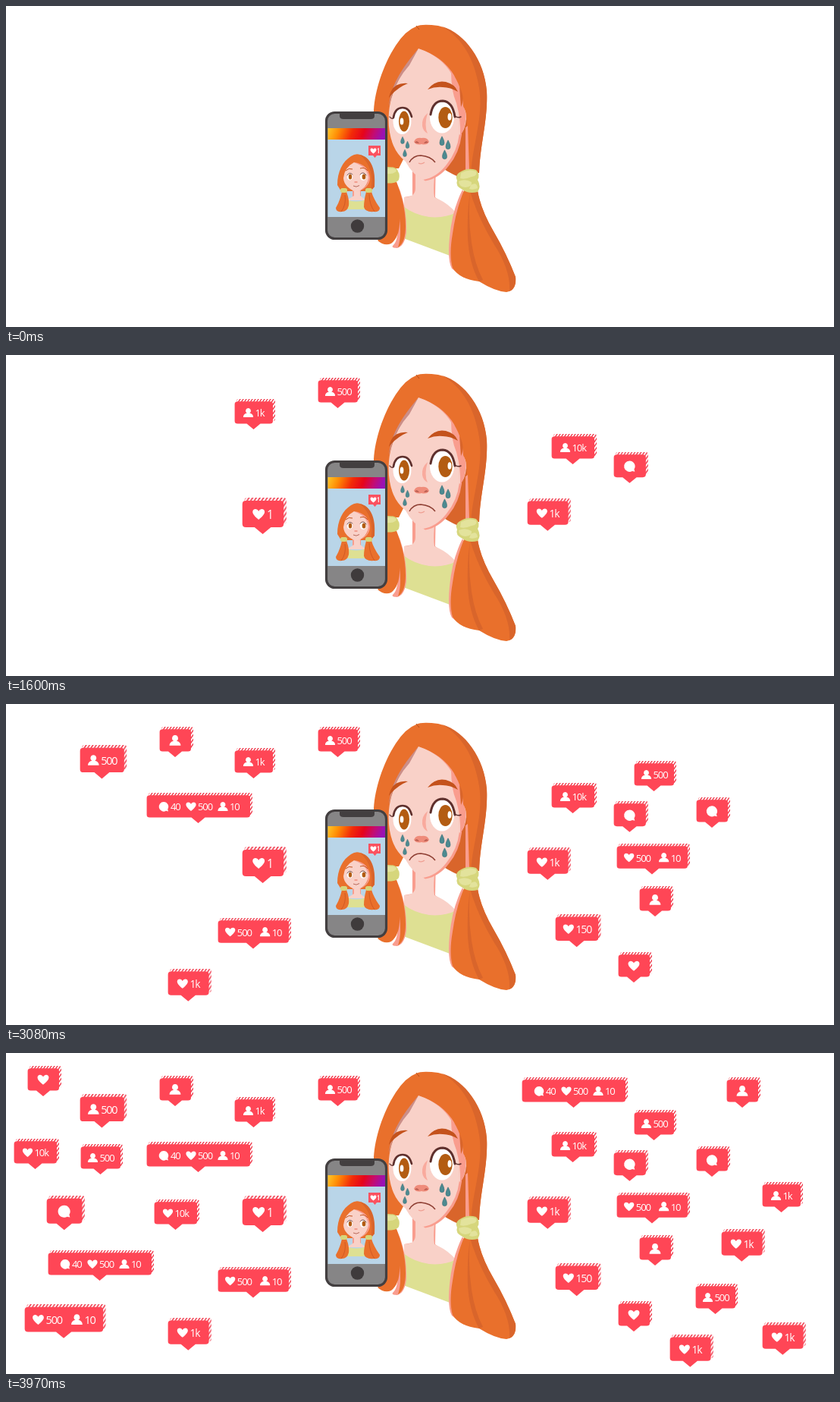
An HTML page for the animation above (4.07 s loop, 1092 px wide and 423 px high).

```html
<!DOCTYPE html>
<html lang="en">
<head>
<meta charset="utf-8">
<title>Likes</title>
<style>
html, body { margin: 0; width: 100%; height: 100%; overflow: hidden; background: #fff; }
svg { display: block; width: 100%; height: 100%; }
.badge text { font: 13px "Open Sans", "Noto Sans", sans-serif; letter-spacing: -1.1px; fill: #fff; }
.hair { fill: #e9702c; }
.dark { fill: #d9652b; }
.skin { fill: #f9d1c8; }
.pink { fill: #f99d8e; }
.band { fill: #d6d67c; }
.light { fill: #e3e39c; }
.shirt { fill: #dee093; }
.iris { fill: #b35c12; }
.lid { fill: none; stroke: #5e302d; stroke-linecap: round; }
.brow { fill: #c4521c; }
.tear { fill: #4d8a90; stroke: #3b6f78; stroke-width: .6; }
</style>
</head>
<body>
<svg viewBox="0 0 1092 423">
  <defs>
    <pattern id="hatch" width="4" height="6" patternUnits="userSpaceOnUse">
      <path d="M-1 7.5L5-1.5M-1 1.5L1-1.5M3 7.5L5 4.5" stroke="#f03c4e" stroke-width="1.5"/>
    </pattern>
    <linearGradient id="bar" x2="1" y2=".08">
      <stop offset="0" stop-color="#ffc928"/>
      <stop offset=".2" stop-color="#ff8d06"/>
      <stop offset=".45" stop-color="#f22a08"/>
      <stop offset=".65" stop-color="#e6041c"/>
      <stop offset=".84" stop-color="#c20c74"/>
      <stop offset="1" stop-color="#9a12b4"/>
    </linearGradient>
    <path id="h" d="M0 5.800C-3.800 2.800-6.600-.2-6.600-2.700C-6.600-6.300-1.900-7 0-3.400C1.900-7 6.600-6.300 6.600-2.700C6.600-.2 3.800 2.800 0 5.800Z"/>
    <path id="p" d="M0-6.4A3.4 3.6 0 0 1 1.8 .3Q6.6 1.4 6.6 5.8H-6.6Q-6.6 1.4-1.8 .3A3.4 3.6 0 0 1 0-6.4Z"/>
    <path id="c" d="M0-6.3A6.3 6.3 0 0 1 5.2 3.4L6 6.2L3 5.5A6.3 6.3 0 1 1 0-6.3Z"/>
    <path id="tear" class="tear" d="M0-6.5Q3.4-.5 3.2 2.6A3.2 3.4 0 0 1-3.2 2.6Q-3.4-.5 0-6.5Z"/>
    <path id="face" d="M544 56C530 76 508 105 505 140Q503 165 511 184Q516 196 527 205Q536 222 550 229Q568 226 581 209Q595 192 598 168L597 120L588 90Q574 66 544 56Z"/>
  </defs>

  <g id="girl">
    <path class="hair" d="M485 142C485 115 497 78 514 52Q527 32 541 27Q548 23 570 26C604 34 631 72 634 112C636 150 625 182 624 220L604 220L570 190L525 200L518 214H500V150Z"/>
    <path class="dark" d="M575 27C606 36 631 72 634 112C636 150 625 182 624 220H613C616 180 630 145 624 108C618 70 602 42 575 27Z"/>
    <path class="dark" d="M600 150L576 214Q590 223 604 228L608 216V150Z"/>
    <path class="pink" d="M536 200H567L566 252L592 272V282H525V252L536 250Z"/>
    <path class="skin" d="M540 206L566 216Q563 240 565 252Q582 259 593 272V284H525V252Q540 252 540 240Z"/>
    <path class="shirt" d="M524 264Q538 275 558 278Q578 280 594 272L588 330L524 306Z"/>

    <path class="pink" d="M515 232Q529 262 528 298Q526 316 516 319Q508 319 510 316Q517 310 517 290L506 240Z"/>
    <path class="hair" d="M500 232H515Q527 262 527 290Q527 312 517 318Q522 304 519 280Q520 304 508 313Q499 317 490 309Q500 300 500 280Z"/>

    <use href="#face" class="pink" x="3" y="1.500"/>
    <use href="#face" class="skin"/>
    <path class="skin" d="M597 132Q607 131 607 148Q606 164 598 170Z"/>
    <path class="pink" d="M587 86Q602 106 603 132Q608 140 606 152Q604 166 599 170Q600 150 594 128Q587 112 587 86Z"/>
    <path class="dark" d="M598 106Q606 122 600 133Z"/>
    <path class="pink" d="M606 160L609 158L611 217H606Z"/>
    <path d="M544 56C526 78 508 100 505 132L508 122Q514 98 532 78Z" fill="#cb8e88"/>
    <path d="M541 26L545 31" stroke="#b8501c" fill="none"/>

    <path class="brow" d="M505 121Q509 100 530 102Q515 108 505 121Z"/>
    <path class="brow" d="M556 110Q566 97 580 100Q592 103 596 113Q586 107 576 107Q566 106 556 110Z"/>

    <ellipse cx="522.500" cy="152" rx="12" ry="17" fill="#fff"/>
    <ellipse class="iris" cx="525" cy="152" rx="7" ry="13.500"/>
    <ellipse cx="522" cy="152" rx="2.400" ry="4.500" fill="#fff"/>
    <path class="lid" stroke-width="2.600" d="M511 147Q513 134 523 134Q532 134 535 146"/>
    <path class="lid" stroke-width="1.300" d="M511 148Q508 149 506 146"/>
    <ellipse cx="575" cy="147" rx="16" ry="20.500" fill="#fff"/>
    <ellipse class="iris" cx="579.500" cy="147" rx="9.200" ry="14"/>
    <ellipse cx="585" cy="146" rx="2.500" ry="4.800" fill="#fff"/>
    <path class="lid" stroke-width="3" d="M560 143Q563 125 576 125Q589 126 592 146"/>
    <path class="lid" stroke-width="1.500" d="M592 145Q596 148 600 146"/>

    <path d="M556 141Q548 148 549 158Q550 165 556 168Q551 158 556 141Z" fill="#f9aa9d"/>
    <path d="M538 179Q540 173 548 174Q556 173 558 179Q555 184 548 182Q541 184 538 179Z" fill="#ef8c7b"/>
    <path d="M539 180Q542 176 545 181ZM551 181Q554 176 557 180Z" fill="#b75a4d"/>
    <path d="M532 206Q537 197 547 197Q560 198 566 206" fill="none" stroke="#8e3f33" stroke-width="1.500"/>
    <path d="M544 207Q548 209 552 206" fill="none" stroke="#efa093" stroke-width="1.300"/>
    <g id="tears"></g>

    <path class="band" d="M500 212Q516 211 517 218Q520 222 518 229Q514 235 500 233Z"/>
    <path class="light" d="M501 214Q512 212 515 217Q512 222 501 221Z"/>

    <path class="pink" d="M602 242Q588 270 585 305Q582 335 588 346L604 358L598 300L606 250Z"/>
    <path class="hair" d="M604 243H622Q626 268 643 297Q660 326 672 357Q674 375 660 377Q645 376 624 363Q598 360 589 345Q584 328 589 300Q593 270 604 243Z"/>
    <path class="dark" d="M612 244H622Q626 268 643 297Q660 326 672 357Q673 372 664 376Q666 348 643 313Q622 278 612 244Z"/>
    <path class="dark" d="M612 246Q609 280 614 312Q618 340 629 361L624 363Q611 340 609 306Q608 270 612 246Z"/>
    <path class="band" d="M597 220Q608 212 620 216Q626 222 622 229Q627 238 622 245Q610 248 602 242Q592 237 595 230Q592 224 597 220Z"/>
    <path class="light" d="M600 220Q610 214 620 218Q622 224 614 225Q605 229 599 227ZM597 231Q606 227 614 232Q615 238 606 239Q597 238 597 231ZM613 236Q621 231 622 240Q616 243 611 241Z"/>
  </g>

  <g id="phone">
    <rect x="422.500" y="140.500" width="79" height="166" rx="11" fill="#868586" stroke="#433f40" stroke-width="3.200"/>
    <path d="M440 139H486V145Q486 149 481 149H445Q440 149 440 145Z" fill="#433f40"/>
    <rect x="424.500" y="161" width="75.500" height="15.500" fill="url(#bar)"/>
    <rect x="424.500" y="176" width="75.500" height="102" fill="#b9d5e8"/>
    <circle cx="463.500" cy="290" r="8.700" fill="#3f3b3c"/>

    <path class="hair" d="M437 236C437 218 444 205 455 198Q461 194 467 196C479 200 487 213 486 238L481 244H442Z"/>
    <path class="dark" d="M467 196C480 199 488 213 486 238L481 244Q487 214 467 196Z"/>
    <path class="pink" d="M457 238H468V252H457Z"/>
    <path class="skin" d="M459 240H467V250L475 256H449L459 250Z"/>
    <path class="shirt" d="M449 255Q462 260 475 255L473 268H450Z"/>
    <path class="pink" d="M460 206Q478 209 480 226Q480 240 462 245Q480 238 477 226Z"/>
    <path class="skin" d="M459 206Q446 213 445 227Q446 239 462 245Q477 240 478 226Q476 212 459 206Z"/>
    <ellipse cx="453.500" cy="225" rx="3.800" ry="4.500" fill="#fff"/>
    <ellipse cx="471" cy="225" rx="4.200" ry="4.800" fill="#fff"/>
    <ellipse class="iris" cx="454" cy="225" rx="2.200" ry="3.500"/>
    <ellipse class="iris" cx="472" cy="225" rx="2.400" ry="3.600"/>
    <path class="lid" stroke-width=".8" d="M450 223Q453 218 457 222M467 222Q471 217 475 223"/>
    <path d="M448 217Q452 213 457 215M467 214Q473 212 477 217" stroke="#c4521c" stroke-width="1" fill="none"/>
    <path d="M459.500 232H463.500" stroke="#ef8c7b" stroke-width="1.500"/>
    <path d="M458 237Q462 239.500 466 236.500" stroke="#a8503f" stroke-width=".8" fill="none"/>
    <path class="hair" d="M443 245H449Q453 255 452 263Q450 271 443 271Q435 272 435 266Q440 258 443 245ZM475 245H482Q485 255 493 266Q493 272 485 271Q474 272 472 265Q472 256 475 245Z"/>
    <path d="M447 249Q449 262 442 271M479 248Q479 261 486 271" stroke="#d25a24" fill="none"/>
    <rect class="band" x="441" y="240" width="9" height="6" rx="2.500"/>
    <rect class="band" x="474" y="240" width="9" height="6" rx="2.500"/>

    <path d="M478 184H494V197H489L486.500 200L484 197H478Z" fill="#fb5260"/>
    <use href="#h" transform="translate(484.500 191) scale(.6)" fill="#fff"/>
    <path d="M489.800 189L491.300 187.500V194" stroke="#fff" fill="none"/>
  </g>
  <g id="badges"></g>
</svg>
<script>
const LOOP = 4070;
const RED = '#ff4656';

// x, y, content, scale — in order of appearance
const badges = [
  [311, 188, 'h1', 1.2], [687, 189, 'h1k', 1.07], [719, 104, 'p10k'], [301, 58, 'p1k'],
  [801, 128, 'c', 1.02], [411, 30, 'p500'], [724, 277, 'h150', 1.08], [279, 282, 'h500 p10', 1.01],
  [828, 75, 'p500'], [805, 184, 'h500 p10', 1.01], [185, 117, 'c40 h500 p10'], [835, 240, 'p'],
  [202, 30, 'p'], [910, 123, 'c'], [213, 349, 'h1k', 1.07], [807, 327, 'h'], [97, 54, 'p500', 1.11],
  [875, 371, 'h1k', 1.07], [98, 120, 'p500'], [909, 304, 'p500'], [55, 260, 'c40 h500 p10'],
  [997, 170, 'p1k'], [53, 188, 'c', 1.13], [950, 32, 'p'], [10, 113, 'h10k'], [24, 331, 'h500 p10', 1.12],
  [943, 232, 'h1k', 1.07], [28, 17, 'h'], [997, 355, 'h1k', 1.07], [195, 193, 'h10k'], [680, 32, 'c40 h500 p10']
];

// the pace quickens: [wait, how many badges]
const pace = [[300, 4], [200, 4], [150, 4], [100, 4], [80, 6], [60, 5], [50, 3], [40, 1]];

const textWidths = { '': 42, '1': 46, '1k': 51, '10k': 57 };

function layout(parts) {
  if (parts.length === 3) return [137, [23, 59, 101]];
  if (parts.length === 2) return [93, [16.5, 62]];
  const text = parts[0].slice(1);
  return [textWidths[text] || 53, [text === '' ? 21 : text in textWidths ? 18.5 : 16.5]];
}

function badgeMarkup([x, y, content, scale = 1]) {
  const parts = content.split(' ');
  const [w, xs] = layout(parts);
  const mid = w / 2, size = content.length === 1 ? 1.13 : 1;
  const items = parts.map((part, i) =>
    `<use href="#${part[0]}" transform="translate(${xs[i]} 18.3) scale(${size})" fill="#fff"/>` +
    `<text x="${xs[i] + 9}" y="23.3">${part.slice(1)}</text>`).join('');
  return `<g class="badge" transform="translate(${x} ${y}) scale(${scale})">
    <rect x="3" y="0" width="${w}" height="29" rx="3" fill="url(#hatch)"/>
    <path d="M4.500 3.300H${w - 4}Q${w} 3.300 ${w} 7V29Q${w} 32.500 ${w - 4} 32.500H${mid + 9}L${mid} 40L${mid - 9} 32.500H4.500Q.6 32.500 .6 29V7Q.6 3.300 4.500 3.300Z" fill="${RED}"/>
    ${items}</g>`;
}

const layer = document.getElementById('badges');
layer.innerHTML = badges.map(badgeMarkup).join('');

const waits = pace.flatMap(([ms, n]) => Array(n).fill(ms));
let time = 0;
[...layer.children].forEach((el, i) => {
  time += waits[i];
  el.animate([
    { opacity: 0, offset: 0, easing: 'step-end' },
    { opacity: 1, offset: time / LOOP, easing: 'step-end' },
    { opacity: 1, offset: 1 }
  ], { duration: LOOP, iterations: Infinity });
});

const tears = [[523, 177, .75], [529.5, 183, .75], [526, 194, .75], [575, 178, .95], [583, 183, .95], [578.5, 196, .95]];
document.getElementById('tears').innerHTML = tears.map(([x, y, s]) =>
  `<use href="#tear" transform="translate(${x} ${y}) scale(${s})"/>`).join('');
</script>
</body>
</html>
```
